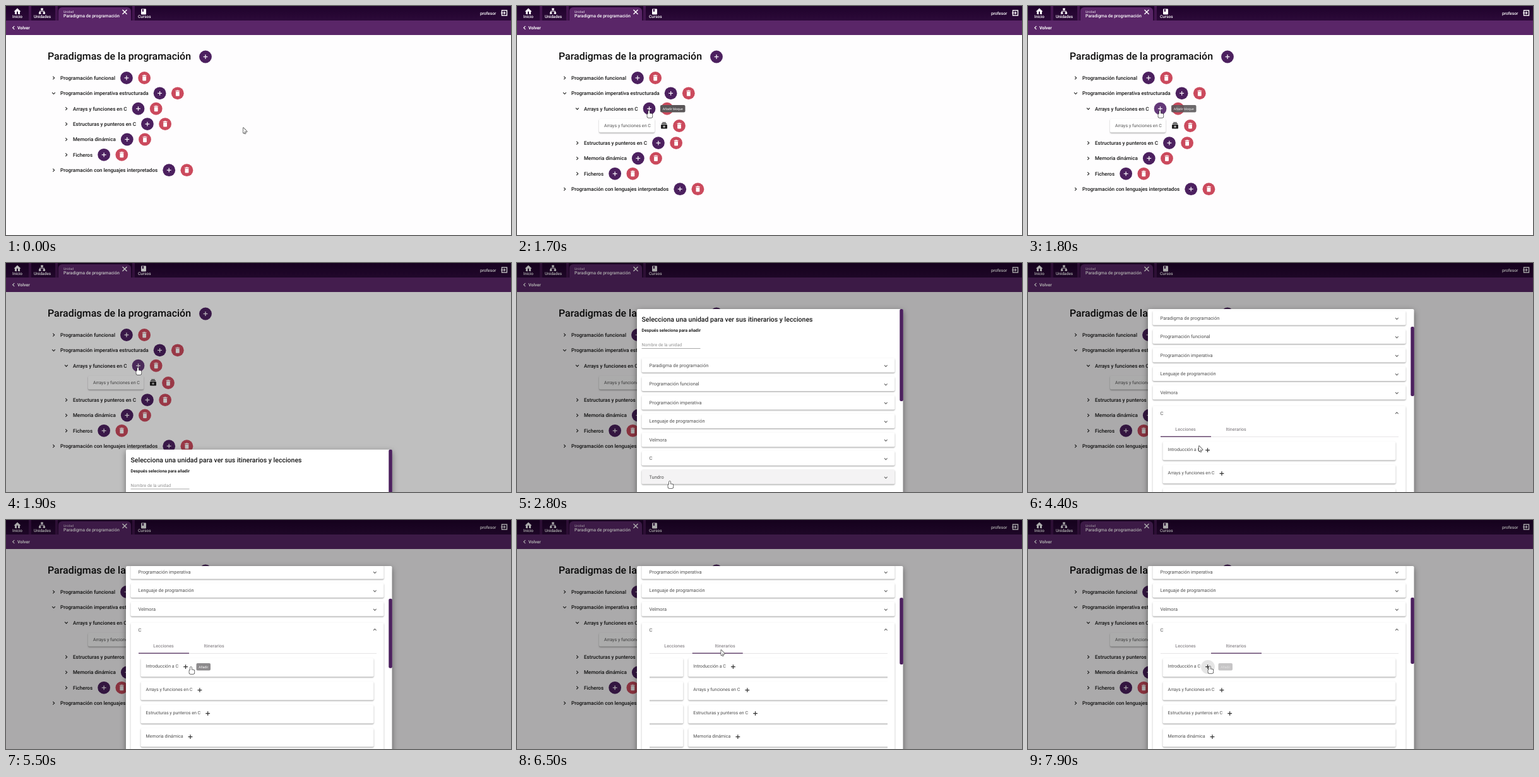
Recreate the animation shown at these times as an HTML page with a canvas. Size 800 by 363 pixels, loop 8 s.

```html
<!DOCTYPE html>
<html lang="es">
<head>
<meta charset="utf-8">
<title>Unidades</title>
<style>
  html, body { margin: 0; width: 100%; height: 100%; overflow: hidden; background: #fff; }
  canvas { display: block; }
</style>
</head>
<body>
<canvas id="stage" width="800" height="363"></canvas>
<script>
const LOOP = 8000, W = 800, H = 363;
const PURPLE = '#4c205f', RED = '#cb4a5d', PAPER = '#fefdfe', WHITE = '#fff';
const ctx = document.getElementById('stage').getContext('2d');
ctx.textRendering = 'geometricPrecision';

const UNITS = ['Paradigma de programación', 'Programación funcional', 'Programación imperativa',
  'Lenguaje de programación', 'Velmora', 'C', 'Tundro'];
const BLOCKS = ['Arrays y funciones en C', 'Estructuras y punteros en C', 'Memoria dinámica', 'Ficheros'];
const LESSONS = ['Introducción a C', ...BLOCKS];
const TREE = ['Programación funcional', 'Programación imperativa estructurada', ...BLOCKS,
  'Programación con lenguajes interpretados'];
const OPEN_UNIT = UNITS.indexOf('C'), OPEN_BLOCK = TREE.indexOf(BLOCKS[0]);

const MOVES = [
  { from: 100, to: 850, x: 96, y: 163, hand: true },
  { from: 1180, to: 1500, x: 209, y: 166, hand: true },
  { from: 2000, to: 2550, x: 242, y: 346, hand: true },
  { from: 2900, to: 3350, x: 246, y: 311, hand: true },
  { from: 3900, to: 4350, x: 271, y: 290, hand: false },
  { from: 4600, to: 5050, x: 293, y: 233, hand: true },
  { from: 5850, to: 6150, x: 330, y: 201, hand: true },
  { from: 6400, to: 6800, x: 288, y: 232, hand: true },
];

const mix = (a, b, u) => a + (b - a) * u;
function ramp(t, a, b) {
  const u = Math.min(1, Math.max(0, (t - a) / (b - a)));
  return u * u * (3 - 2 * u);
}

function rect(x, y, w, h, color, radius = 0) {
  ctx.fillStyle = color;
  ctx.beginPath();
  ctx.roundRect(x, y, w, h, radius);
  ctx.fill();
}

function disc(x, y, r, color) {
  ctx.fillStyle = color;
  ctx.beginPath();
  ctx.arc(x, y, r, 0, 7);
  ctx.fill();
}

function line(x1, y1, x2, y2, color, width = 1) {
  ctx.strokeStyle = color;
  ctx.lineWidth = width;
  ctx.beginPath();
  ctx.moveTo(x1, y1);
  ctx.lineTo(x2, y2);
  ctx.stroke();
}

function clipTo(x, y, w, h) {
  ctx.beginPath();
  ctx.rect(x, y, w, h);
  ctx.clip();
}

// Returns the width of the written text.
function text(str, x, y, size, color, weight = 400, align = 'left') {
  ctx.font = `${weight} ${size}px Roboto, sans-serif`;
  ctx.textAlign = align;
  ctx.fillStyle = color;
  ctx.fillText(str, x, y + size * 0.35);
  return ctx.measureText(str).width;
}

function card(x, y, w, h, color = WHITE) {
  ctx.save();
  ctx.shadowColor = 'rgba(0,0,0,.34)';
  ctx.shadowBlur = 2;
  ctx.shadowOffsetY = 1.2;
  rect(x, y, w, h, color, 2);
  ctx.restore();
}

function plus(x, y, r, color, width) {
  line(x - r, y, x + r, y, color, width);
  line(x, y - r, x, y + r, color, width);
}

// turns: 0 down, 1 up, -0.5 right, 0.5 left
function chevron(x, y, turns, color, r = 2.4) {
  ctx.save();
  ctx.translate(x, y);
  ctx.rotate(turns * Math.PI);
  line(-r, -r / 2, 0.3, r / 2 + 0.3, color, 1.1);
  line(r, -r / 2, -0.3, r / 2 + 0.3, color, 1.1);
  ctx.restore();
}

function addButton(x, y, color = PURPLE) {
  disc(x, y, 9.9, color);
  plus(x, y, 3.4, '#f4eef6', 1.3);
}

function deleteButton(x, y) {
  disc(x, y, 9.9, RED);
  rect(x - 3.4, y - 4.2, 6.8, 1.1, WHITE);
  rect(x - 1.4, y - 4.9, 2.8, 1, WHITE);
  rect(x - 2.9, y - 2.5, 5.8, 6.9, WHITE, 0.8);
}

function tooltip(str, x, y, w, alpha, color) {
  ctx.save();
  ctx.globalAlpha = alpha;
  rect(x, y, w, 11.5, color, 2);
  text(str, x + w / 2, y + 5.7, 5.2, WHITE, 400, 'center');
  ctx.restore();
}

function homeIcon(x, y) {
  rect(x - 4, y, 3, 5.5, WHITE);
  rect(x + 1, y, 3, 5.5, WHITE);
  ctx.beginPath();
  ctx.moveTo(x - 5.5, y + 1.2);
  ctx.lineTo(x, y - 4);
  ctx.lineTo(x + 5.5, y + 1.2);
  ctx.fill();
}

function treeIcon(x, y) {
  rect(x - 1.8, y - 4.5, 3.6, 3, WHITE);
  line(x, y - 2, x, y + 0.2, WHITE);
  line(x - 3.7, y + 0.2, x + 3.7, y + 0.2, WHITE);
  for (const side of [-1, 1]) {
    line(x + side * 3.3, y, x + side * 3.3, y + 2, WHITE);
    rect(x + side * 3.3 - 1.7, y + 1.7, 3.4, 3, WHITE);
  }
}

function header() {
  const bar = ctx.createLinearGradient(0, 0, 0, 23);
  bar.addColorStop(0, '#1f022b');
  bar.addColorStop(1, '#2c0a39');
  rect(0, 0, W, 23, bar);
  for (const x of [36, 78, 200]) rect(x, 0, 4, 23, '#43164f');
  rect(0, 23, W, 23, '#5a2668');
  rect(83, 2, 115, 22, '#5a2668', [6, 6, 0, 0]);

  homeIcon(18, 7.5);
  treeIcon(57, 8);
  rect(214, 4.5, 8, 9, WHITE, 1);
  rect(215.7, 5, 2.4, 4, '#4d2959');
  text('Inicio', 18, 17, 6.5, WHITE, 500, 'center');
  text('Unidades', 57.5, 17, 6.5, WHITE, 500, 'center');
  text('Cursos', 219.3, 17, 6.5, WHITE, 500, 'center');
  text('Unidad', 91, 9, 5.2, '#e5d9e8');
  text(UNITS[0], 91, 15.3, 7, WHITE, 500);
  line(184.5, 6, 191.5, 13, WHITE, 1.4);
  line(191.5, 6, 184.5, 13, WHITE, 1.4);

  text('profesor', 751, 11.5, 6.7, WHITE, 500);
  ctx.strokeRect(785.5, 7, 8, 8);
  line(784, 11, 790.5, 11, WHITE, 1.1);
  chevron(789.7, 11, -0.5, WHITE, 2);
  chevron(12, 34.5, 0.5, WHITE, 2.6);
  text('Volver', 18, 34.3, 6.9, WHITE, 700);
}

function blockCard(open) {
  ctx.save();
  ctx.globalAlpha = open;
  clipTo(110, 174, 180, 30 * open);
  card(130, 179, 88, 21.5);
  text(BLOCKS[0], 138, 189.5, 7.1, '#555');
  rect(228, 188, 10, 6.5, '#222', 1);
  rect(229, 186, 8, 1.2, '#222');
  rect(230.2, 184.2, 5.6, 1.1, '#222');
  plus(233, 191.2, 1.8, WHITE, 0.9);
  deleteButton(257, 190);
  ctx.restore();
}

function page(t) {
  rect(0, 0, W, H, PAPER);
  header();
  text('Paradigmas de la programación', 66, 79.5, 15.95, '#0c0c0c', 500);
  addButton(316, 80.5);

  const open = ramp(t, 1050, 1250);
  TREE.forEach((label, i) => {
    const indent = BLOCKS.includes(label) ? 20 : 0;
    const y = 114 + i * 24.37 + (i > OPEN_BLOCK ? 30 * open : 0);
    const unfolded = i === OPEN_BLOCK ? open : i === OPEN_BLOCK - 1 ? 1 : 0;
    chevron(75.5 + indent, y, (unfolded - 1) / 2, '#2a2a2a');
    const end = 86 + indent + text(label, 86 + indent, y, 8.12, '#161616', 500);
    addButton(end + 18, y, i === OPEN_BLOCK && t > 1780 ? '#633878' : PURPLE);
    deleteButton(end + 46.2, y);
  });
  if (open > 0) blockCard(open);
  tooltip('Añadir bloque', 227, 157, 39.5, ramp(t, 1520, 1640) - ramp(t, 1780, 1880), '#5a5658');
}

function lessons(top, dx) {
  LESSONS.forEach((label, i) => {
    const y = top + i * 37;
    card(213.5 + dx, y - 13, 369, 29.5);
    const width = text(label, 221.5 + dx, y, 7.1, '#4d4d4d');
    plus(221.5 + dx + width + 11.5, y + 0.7, 3.4, '#333', 1.2);
  });
}

function openUnit(t, y, swap) {
  text('Lecciones', 249.5, y + 26, 7.1, '#8e8a8e', 500, 'center');
  text('Itinerarios', 329.7, y + 26, 7.1, '#8e8a8e', 500, 'center');
  rect(210, y + 37.3, 377, 0.8, '#dedbde');
  rect(210 + 80 * swap, y + 36.5, 80, 1.4, '#66476f');

  ctx.save();
  clipTo(210, y + 39, 377, 400);
  if (swap < 1) lessons(y + 58, -377 * swap);
  if (swap > 0) lessons(y + 58, 377 * (1 - swap));
  disc(285, y + 59, 11 * ramp(t, 7740, 7890), 'rgba(0,0,0,.1)');
  ctx.restore();

  const first = ramp(t, 5120, 5280) - ramp(t, 5500, 5700);
  const second = ramp(t, 6880, 7050) - 0.5 * ramp(t, 7780, 7900);
  tooltip('Añadir', 301.5, y + 53, 22.5, first + second, '#8d8b8d');
}

function dialog(t) {
  const top = mix(H, 73, ramp(t, 1826, 2066));
  const open = ramp(t, 3680, 3880);
  const swap = ramp(t, 6200, 6600);
  const scroll = 75 * ramp(t, 3900, 4300) + 64 * ramp(t, 4600, 5000);
  const hovered = t < 2500 || t > 3680 ? -1 : t < 3080 ? OPEN_UNIT + 1 : OPEN_UNIT;

  ctx.save();
  ctx.shadowColor = 'rgba(0,0,0,.45)';
  ctx.shadowBlur = 10;
  ctx.shadowOffsetY = 3;
  rect(190, top, 421.5, 400, WHITE, 2);
  ctx.restore();

  ctx.save();
  clipTo(190, top, 421.5, 400);
  ctx.translate(0, top - scroll);
  text('Selecciona una unidad para ver sus itinerarios y lecciones', 197.5, 16.5, 10.5, '#161616', 500);
  text('Después seleciona para añadir', 197.5, 34, 6.8, '#222', 700);
  text('Nombre de la unidad', 197.5, 57, 6.9, '#929292');
  rect(197.5, 62, 93, 0.8, '#8d8d8d');

  UNITS.forEach((label, i) => {
    const grown = i === OPEN_UNIT ? open : 0;
    const y = 89 + i * 29.5 + 3.5 * grown + (i > OPEN_UNIT ? 290 * open : 0);
    card(197.5, y - 11.5, 401, 23 + 265 * grown, i === hovered ? '#f4f3f4' : WHITE);
    if (grown > 0) {
      ctx.save();
      clipTo(197.5, y - 11, 401, 23 + 264 * grown);
      openUnit(t, y, swap);
      ctx.restore();
    }
    text(label, 209.5, y, 7.45, '#505050');
    chevron(584.3, y + 1 - grown, grown, '#707070');
  });
  ctx.restore();
  rect(606.3, top + scroll * mix(0.373, 0.36, swap), 5.5, 146 - 36 * open - 5 * swap, PURPLE, 2);
}

function handShape() {
  const shape = new Path2D();
  shape.roundRect(-1, 0, 2, 7, 1);
  shape.roundRect(-2.6, 4.4, 8, 6.6, 2);
  return shape;
}

function arrowShape() {
  const shape = new Path2D();
  shape.moveTo(0, 0);
  shape.lineTo(0, 8.2);
  shape.lineTo(5.7, 6);
  shape.closePath();
  shape.rect(2, 6, 1.5, 3.2);
  return shape;
}

function pointer(t) {
  let x = 376, y = 193, hand = false;
  for (const move of MOVES) {
    if (t < move.from) break;
    const u = ramp(t, move.from, move.to);
    x = mix(x, move.x, u);
    y = mix(y, move.y, u);
    if (u > 0.05) hand = u > 0.95 && move.hand;
  }
  const shape = hand ? handShape() : arrowShape();
  ctx.save();
  ctx.translate(x, y);
  ctx.lineJoin = 'round';
  ctx.strokeStyle = '#444';
  ctx.lineWidth = 1.5;
  ctx.stroke(shape);
  ctx.fillStyle = WHITE;
  ctx.fill(shape);
  ctx.restore();
}

function draw(t) {
  page(t);
  rect(0, 0, W, H, `rgba(0,0,0,${0.33 * ramp(t, 1800, 1950)})`);
  if (t > 1826) dialog(t);
  pointer(t);
}

const start = performance.now();
function frame() {
  draw((performance.now() - start) % LOOP);
  requestAnimationFrame(frame);
}
frame();
</script>
</body>
</html>
```
